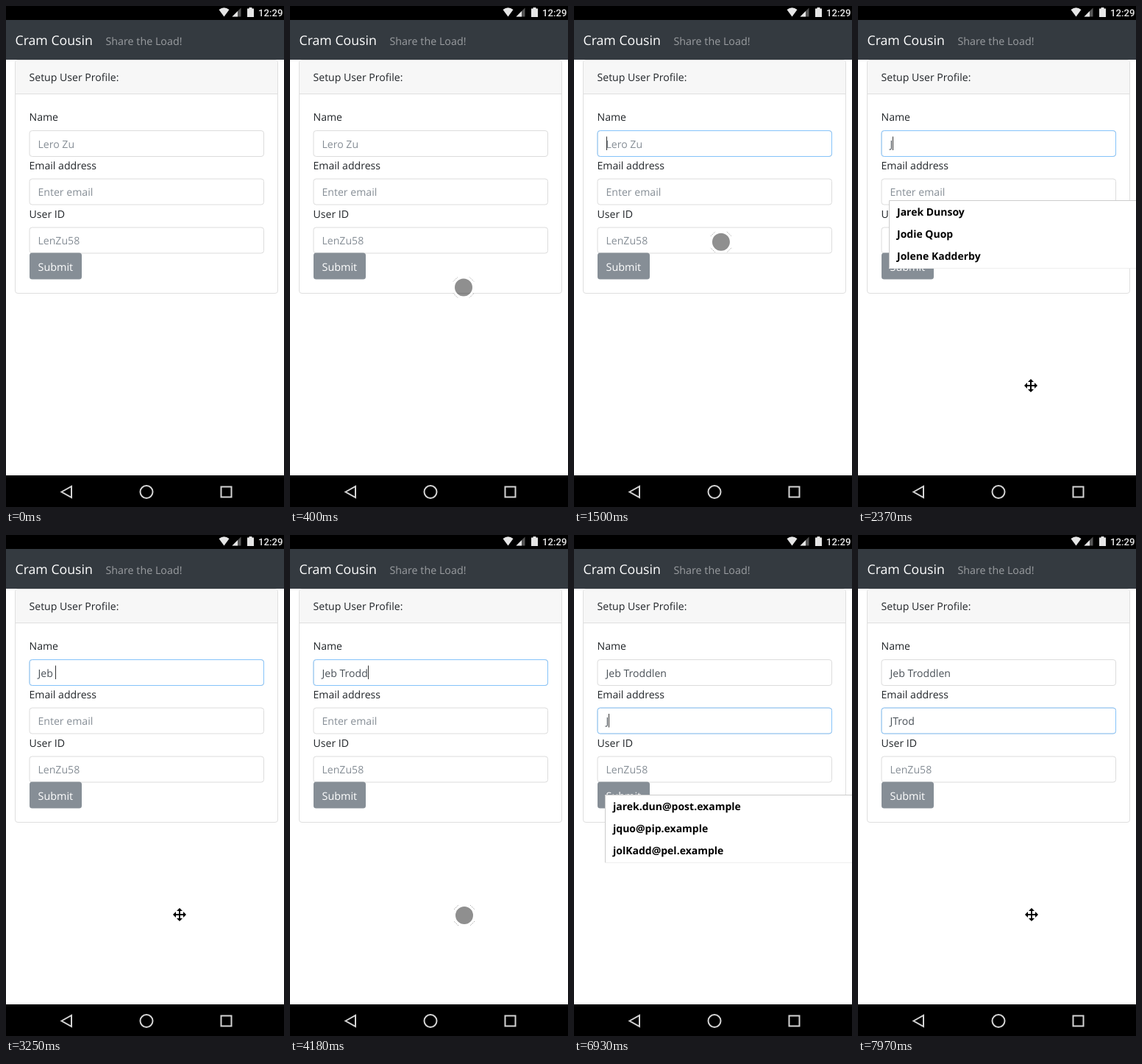
An HTML page for the animation above (8000 ms loop, 378 by 681 pixels).

```html
<!DOCTYPE html>
<html lang="en">
<head>
<meta charset="utf-8">
<title>User profile form</title>
<style>
  html, body { margin: 0; width: 100%; height: 100%; overflow: hidden; background: #fff; }
  svg { display: block; width: 378px; height: 681px; }
  text { font: 14.1px "Open Sans", "Noto Sans", sans-serif; white-space: pre; text-rendering: geometricPrecision; fill: #212529; }
  .brand { font-size: 17.7px; fill: #fff; }
  .tag { font-size: 14.3px; fill: #9a9da0; }
  .hint { fill: #868e96; }
  .value { fill: #495057; }
  .button { font-size: 14.4px; fill: #fff; }
  .option { font-size: 14px; font-weight: 700; fill: #000; }
  .clock { font: 500 13.2px Roboto, sans-serif; fill: #e6e6e6; }
</style>
</head>
<body>
<svg id="stage" viewBox="0 0 378 681">
  <rect width="378" height="681" fill="#fff"/>

  <!-- status bar -->
  <rect width="378" height="19" fill="#000"/>
  <path d="M289.500 5Q296.500 -0.500 303.500 5L296.500 14.500Z" fill="#e6e6e6"/>
  <path d="M319.500 2.500V14.500H307.500Z" fill="#555"/>
  <path d="M315 7V14.500H307.500Z" fill="#e6e6e6"/>
  <path d="M328 3.500H330.500V2H334.500V3.500H337V15H328Z" fill="#e6e6e6"/>
  <text class="clock" x="343" y="14">12:29</text>

  <!-- title bar -->
  <rect y="19" width="378" height="54" fill="#343a40"/>
  <text class="brand" x="12.500" y="53">Cram Cousin</text>
  <text class="tag" x="135.500" y="53">Share the Load!</text>

  <!-- card -->
  <rect x="12.500" y="73.500" width="357" height="317" rx="3.500" fill="#fff" stroke="#dfdfdf"/>
  <path d="M13 119V77a3 3 0 0 1 3-3H366a3 3 0 0 1 3 3V119Z" fill="#f7f7f7"/>
  <path d="M13 119.500H369" stroke="#dfdfdf"/>
  <text x="31.500" y="102">Setup User Profile:</text>
  <g id="form"></g>
  <rect x="32" y="335.500" width="71" height="36" rx="3.500" fill="#868e96"/>
  <text class="button" x="43.500" y="360">Submit</text>

  <g id="menus"></g>

  <!-- navigation bar -->
  <rect y="638" width="378" height="43" fill="#000"/>
  <g fill="none" stroke="#d4d4d4" stroke-width="2">
    <path d="M75.500 660.500L89 653V668Z"/>
    <circle cx="191" cy="660.500" r="8.500"/>
    <rect x="292.500" y="653.500" width="14" height="14"/>
  </g>

  <g id="touch">
    <circle r="13" fill="none" stroke="#fff" stroke-width="2"/>
    <circle r="12" fill="#000" fill-opacity=".44"/>
    <path d="M-14-8L-8-14M8-14L14-8M14 8L8 14M-8 14L-14 8" stroke="#999" stroke-width=".8" stroke-dasharray="1.500 1"/>
  </g>
  <path id="arrows" fill="#000" stroke="#fff" stroke-width="1.500" paint-order="stroke"
    d="M0-9l4 4h-3v4h4v-3l4 4-4 4v-3h-4v4h3l-4 4-4-4h3v-4h-4v3l-4-4 4-4v3h4v-4h-3z"/>
</svg>
<script>
const LOOP = 8000, BLINK = 510, FADE = 150, STEP = 70;
const $ = id => document.getElementById(id);

function add(parent, tag, attrs, label = "") {
  const el = document.createElementNS("http://www.w3.org/2000/svg", tag);
  for (const key in attrs) el.setAttribute(key, attrs[key]);
  el.textContent = label;
  parent.append(el);
  return el;
}
const show = (el, on) => el.setAttribute("visibility", on ? "visible" : "hidden");
const clamp = v => Math.min(1, Math.max(0, v));

function makeField(y, label, hint, options = {}) {
  const form = $("form");
  const box = { x: 32, y: y + 0.5, width: 318.5, height: 35, rx: 3.5 };
  add(form, "text", { x: 31.5, y: y - 13 }, label);
  add(form, "rect", { ...box, fill: "#fff", stroke: "#dcdcdc" });
  return {
    typed: "", keys: [], focus: Infinity, blur: Infinity, ...options,
    ring: add(form, "rect", { ...box, fill: "none", stroke: "#85c3fa", opacity: 0 }),
    hint: add(form, "text", { class: "hint", x: 43.5, y: y + 23.5 }, hint),
    value: add(form, "text", { class: "value", x: 43.5, y: y + 23.5 }),
    caret: add(form, "rect", { x: 44, y: y + 8.5, width: 1, height: 18.5, fill: "#333" })
  };
}

function makeMenu(y, from, to, options) {
  const el = add($("menus"), "g", {});
  add(el, "rect", { x: 42, y, width: 340, height: 92.5, fill: "#fff" });
  add(el, "path", { d: `M42.5 ${y + 92}V${y + 0.5}H380`, fill: "none", stroke: "#ccc" });
  add(el, "path", { d: `M42 ${y + 92.5}H380`, stroke: "#eee" });
  options.forEach((s, i) => add(el, "text", { class: "option", x: 53, y: y + 21 + 30 * i }, s));
  return { el, from, to };
}

const fields = [
  makeField(169, "Name", "Lero Zu", {
    typed: "Jeb Troddlen", focus: 1260, blur: 5600,
    keys: [2150, 2470, 2700, 2770, 3400, 3640, 3700, 3940, 4180, 4830, 4890, 5060]
  }),
  makeField(234.5, "Email address", "Enter email", {
    typed: "JTrod", focus: 5600, keys: [6600, 7000, 7080, 7220, 7450]
  }),
  makeField(300.5, "User ID", "LenZu58")
];

const menus = [
  makeMenu(264, 2370, 2470, ["Jarek Dunsoy", "Jodie Quop", "Jolene Kadderby"]),
  makeMenu(353, 6750, 7000, ["jarek.dun@post.example", "jquo@pip.example", "jolKadd@pel.example"])
];

// start, end, from x, y, to x, y
const moves = [
  [180, 600, 304, 560, 168, 205],
  [600, 780, 168, 205, 172, 201],
  [860, 1010, 172, 201, 176.5, 193.5],
  [1260, 1750, 176.5, 193.5, 236, 517],
  [2470, 2540, 236, 517, 237, 517]
];

// pointer shape from each time on
const shapes = [
  [0, ""], [180, "touch"], [2220, "arrows"], [2470, ""], [2540, "touch"], [2770, "arrows"],
  [3470, "touch"], [6370, "arrows"], [6670, "touch"], [6930, ""], [7150, "touch"], [7800, "arrows"]
];

function pointerAt(t) {
  const [t0, t1, x0, y0, x1, y1] = moves.filter(m => t >= m[0]).pop() || moves[0];
  const held = t >= t1 ? t1 : t0 + Math.floor((t - t0) / STEP) * STEP;
  const p = clamp((held - t0) / (t1 - t0));
  const e = p * p * (3 - 2 * p);
  return [x0 + (x1 - x0) * e, y0 + (y1 - y0) * e];
}

function drawField(f, t) {
  const count = f.keys.filter(k => t >= k).length;
  const last = count ? f.keys[count - 1] : f.focus;
  const text = f.typed.slice(0, count);
  if (f.value.textContent !== text) f.value.textContent = text;
  show(f.hint, !count);
  f.ring.setAttribute("opacity", clamp((t - f.focus) / FADE) * (1 - clamp((t - f.blur) / FADE)));
  f.caret.setAttribute("x", Math.round(43.5 + (count ? f.value.getComputedTextLength() : 0)));
  show(f.caret, t >= f.focus && t < f.blur && t - last < BLINK);
}

function draw(t) {
  fields.forEach(f => drawField(f, t));
  menus.forEach(m => show(m.el, t >= m.from && t < m.to));
  const shape = shapes.filter(s => t >= s[0]).pop()[1];
  const [x, y] = pointerAt(t);
  show($("touch"), shape === "touch");
  show($("arrows"), shape === "arrows");
  $("touch").setAttribute("transform", `translate(${x} ${y})`);
  $("arrows").setAttribute("transform", `translate(${Math.round(x) - 1} ${Math.round(y) - 1})`);
}

function tick() {
  draw(performance.now() % LOOP);
  requestAnimationFrame(tick);
}
tick();
</script>
</body>
</html>
```
